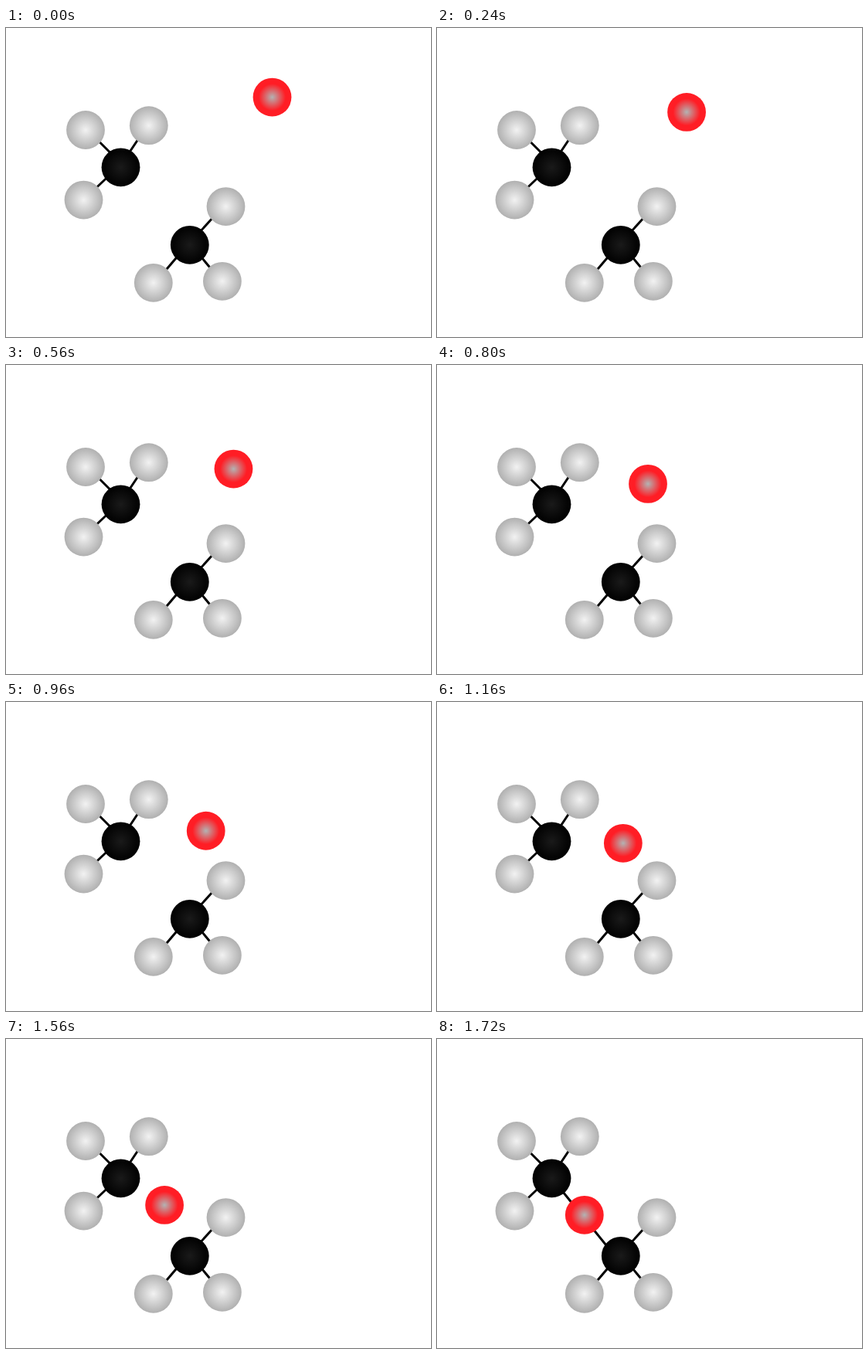
An HTML page that plays this animation: 550 px wide and 400 px high, repeating every 2.16 s.

```html
<!DOCTYPE html>
<html lang="en">
<head>
<meta charset="utf-8">
<style>
  html, body { margin: 0; width: 100%; height: 100%; overflow: hidden; background: #fff; }
  svg { display: block; }
  line { stroke: #000; stroke-width: 3; }
</style>
</head>
<body>
<svg width="550" height="400" viewBox="0 0 550 400">
  <defs>
    <radialGradient id="hydrogen">
      <stop offset="0" stop-color="#f2f2f2"/>
      <stop offset="1" stop-color="#b0b0b0"/>
    </radialGradient>
    <radialGradient id="carbon">
      <stop offset="0" stop-color="#1a1a1a"/>
      <stop offset="1" stop-color="#000"/>
    </radialGradient>
    <radialGradient id="oxygen">
      <stop offset="0" stop-color="#b3b3b3"/>
      <stop offset=".7" stop-color="#ff1d25"/>
    </radialGradient>
  </defs>
  <g id="bonds"></g>
  <g id="newBonds"></g>
  <g id="atoms"></g>
</svg>
<script>
const LOOP = 2160, STEP = 40, TRAVEL = 1720;
const START = [344.5, 89.6], END = [190.8, 227.8];
const byId = id => document.getElementById(id);

function add(parent, tag, attributes) {
  const node = document.createElementNS("http://www.w3.org/2000/svg", tag);
  for (const name in attributes) node.setAttribute(name, attributes[name]);
  return byId(parent).appendChild(node);
}
const bond = (parent, x1, y1, x2, y2) => add(parent, "line", { x1, y1, x2, y2 });
const atom = (kind, cx, cy) => add("atoms", "circle", { cx, cy, r: 24.9, fill: `url(#${kind})` });

bond("bonds", 119, 145.5, 137, 163.5);
bond("bonds", 172, 142.5, 158, 163.5);
bond("bonds", 115, 208.5, 133, 191.5);
bond("bonds", 269, 244, 250, 265);
bond("bonds", 205.5, 315, 222.5, 295);
bond("bonds", 251.5, 295, 265.5, 312);
bond("newBonds", 161, 195.5, 176, 214);
bond("newBonds", 202, 246, 221, 269.5);

for (const [x, y] of [[103, 132], [184.8, 126.2], [100.5, 222.6],
                      [284.5, 231.1], [190.8, 329.8], [279.9, 327.8]]) atom("hydrogen", x, y);
atom("carbon", 148.5, 180.3);
atom("carbon", 237.8, 280.8);
const oxygen = atom("oxygen", ...START);

function draw(now) {
  const time = Math.floor((now % LOOP) / STEP) * STEP;
  const progress = Math.min(time / TRAVEL, 1);
  const [x, y] = START.map((from, i) => from + (END[i] - from) * progress);
  oxygen.setAttribute("cx", x);
  oxygen.setAttribute("cy", y);
  byId("newBonds").setAttribute("visibility", progress < 1 ? "hidden" : "visible");
}

const begin = performance.now();
function tick() {
  draw(performance.now() - begin);
  requestAnimationFrame(tick);
}
draw(0);
requestAnimationFrame(tick);
</script>
</body>
</html>
```
